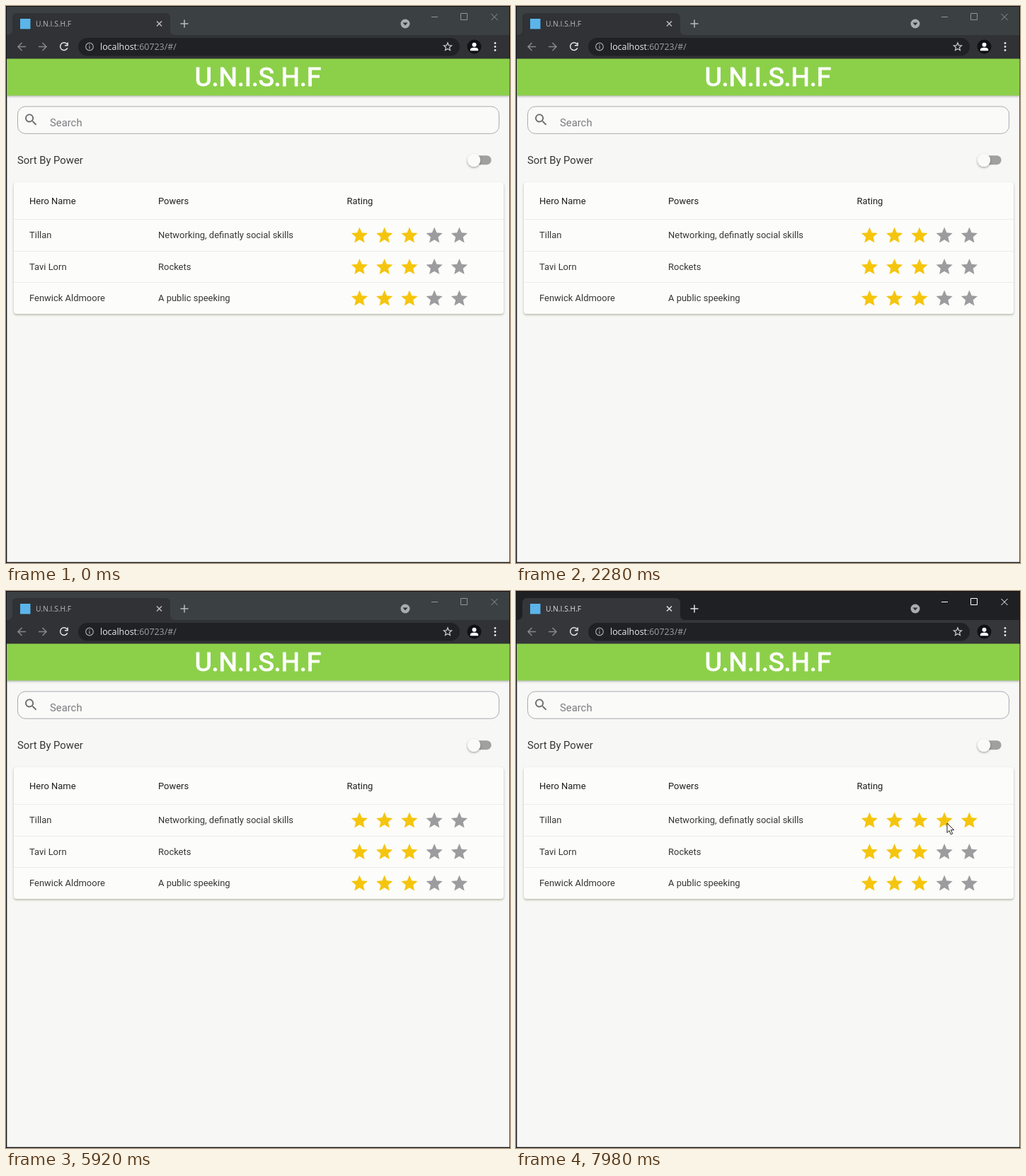
Animation of 712 by 787 pixels, one loop 8 s. Source, as an HTML page:

```html
<!DOCTYPE html>
<html lang="en">
<head>
<meta charset="utf-8">
<title>Hero ratings</title>
<style>
  html, body { margin: 0; width: 100%; height: 100%; overflow: hidden; background: #f7f8f5; }
  svg { display: block; width: 100%; height: 100%; --frame: #3b4043; --control: #929598; --tab-text: #b9bcbf; --tab: #303235; }
  svg.focused { --frame: #1e2023; --control: #fff; --tab-text: #dfe1e5; --tab: #35363a; }
  text { font-family: Roboto, sans-serif; font-size: 12.98px; fill: #363636; }
  .heading { fill: #1f1f1f; }
  .title { font-size: 37.08px; fill: #fff; stroke: #fff; stroke-width: 1.2; }
  .body { font-size: 14.83px; }
  .chrome { font-family: "Open Sans", sans-serif; }
  .line { fill: none; stroke-width: 1.5; }
</style>
</head>
<body>
<svg id="stage" viewBox="0 0 712 787">
  <defs>
    <path id="star" transform="scale(1.158) translate(-12 -12)" d="M12 17.27 18.18 21l-1.64-7.03L22 9.24l-7.19-.61L12 2 9.19 8.63 2 9.24l5.46 4.73L5.82 21z"/>
    <filter id="soft" x="-20%" y="-20%" width="140%" height="150%"><feGaussianBlur stdDeviation="1.8"/></filter>
  </defs>

  <!-- Browser window -->
  <rect width="712" height="787" fill="#111214"/>
  <rect x="1" y="1" width="710" height="41" fill="var(--frame)"/>
  <path fill="var(--tab)" d="M1 41q8 0 8-7V17q0-7 7-7H225q7 0 7 7V34q0 7 7 7H711V75H1z"/>
  <rect x="20" y="18" width="14.5" height="14.5" fill="#5bb5ea"/>
  <text class="chrome" x="42" y="29" style="font-size:10.3px;fill:var(--tab-text)">U.N.I.S.H.F</text>
  <path class="line" stroke="var(--tab-text)" d="M213 21.5l7 7m0-7l-7 7M246.5 25h11m-5.5-5.5v11"/>
  <circle cx="564" cy="25" r="6.5" fill="#a9adb1"/>
  <path fill="#303235" d="M560.5 23.5h7l-3.5 4z"/>
  <path fill="none" stroke="var(--control)" d="M601 15.5h9M642.5 10.5h9v9h-9zM685.5 11l9 9m0-9l-9 9"/>
  <g class="line" stroke="#85898d">
    <path d="M28 57.5H17m5.5-5.5L17 57.5l5.5 5.5M46 57.5h11m-5.5-5.5 5.5 5.5-5.5 5.5"/>
    <path stroke="#e4e6e8" d="M86.2 54A5.3 5.3 0 1 0 86.8 59.2M87.2 51.5v4.2H83"/>
  </g>
  <rect x="102" y="45" width="539" height="25.5" rx="12.75" fill="#202124"/>
  <g fill="none" stroke="#a3a7ab" stroke-width="1.2">
    <circle cx="118" cy="57.5" r="5.3"/>
    <path d="M118 56.5v4M118 54v1.3"/>
  </g>
  <text class="chrome" x="133" y="62" style="font-size:12.4px;fill:#e8eaed">localhost<tspan fill="#9aa0a6">:60723/#/</tspan></text>
  <use href="#star" transform="translate(624 57.5) scale(.48)" fill="none" stroke="#c9ccd0" stroke-width="2.2"/>
  <circle cx="661.5" cy="57.5" r="10" fill="#101114"/>
  <path fill="#fff" d="M655.8 63.2v-1.4q0-3 5.7-3t5.7 3v1.4z"/>
  <circle cx="661.5" cy="54.7" r="3" fill="#fff"/>
  <g fill="#e4e6e8"><circle cx="691" cy="52.5" r="1.4"/><circle cx="691" cy="57.5" r="1.4"/><circle cx="691" cy="62.5" r="1.4"/></g>

  <!-- Page -->
  <rect x="1.3" y="75" width="710" height="710.7" fill="#f7f8f5"/>
  <rect x="1.3" y="78" width="710" height="50" fill="#0004" filter="url(#soft)"/>
  <rect x="1.3" y="74.5" width="710" height="52" fill="#8cd04a"/>
  <text class="title" x="356" y="113.3" text-anchor="middle">U.N.I.S.H.F</text>

  <rect x="16.5" y="142" width="680" height="38.3" rx="11" fill="#fafaf8" stroke="#aaa9b3"/>
  <path fill="#706d70" transform="translate(24.3 149.6) scale(.927)" d="M15.5 14h-.79l-.28-.27C15.41 12.59 16 11.11 16 9.5 16 5.91 13.09 3 9.5 3S3 5.91 3 9.5 5.91 16 9.5 16c1.61 0 3.09-.59 4.23-1.57l.27.28v.79l5 4.99L20.49 19zm-6 0C7.01 14 5 11.99 5 9.5S7.01 5 9.5 5 14 7.01 14 9.5 11.99 14 9.5 14z"/>
  <text class="body" x="62" y="169.8" style="fill:#7d7c80">Search</text>
  <text class="body" x="16" y="222.7">Sort By Power</text>
  <rect x="655" y="211.2" width="30.6" height="13" rx="6.5" fill="#a0a09f"/>
  <circle cx="661" cy="219.3" r="9.3" fill="#0005" filter="url(#soft)"/>
  <circle cx="661" cy="217.8" r="9.3" fill="#fafafa"/>

  <rect x="11" y="250.5" width="692" height="186" rx="4" fill="#46562c66" filter="url(#soft)"/>
  <rect x="11" y="249" width="692" height="186" rx="4" fill="#fcfcfa"/>
  <path stroke="#ecece7" d="M11 301.5H703M11 346.5H703M11 390.5H703"/>
  <g id="table"></g>

  <path id="cursor" fill="#fff" stroke="#222" d="M0 0v13.5l3.1-2.9 2.3 5.3 2.3-1-2.3-5.2h4.3z"/>
</svg>
<script>
const LOOP = 8000, FOCUS_AT = 6300, RATED_AT = 7400;
const GOLD = '#f5c50e', GREY = '#9c9c9e';
const COLUMNS = [33, 215, 481.5];
const HEROES = [
  ['Tillan', 'Networking, definatly social skills'],
  ['Tavi Lorn', 'Rockets'],
  ['Fenwick Aldmoore', 'A public speeking'],
];
// Pointer stops: time, x, y
const POINTER = [[6900, 668, 300], [7300, 640, 325], [7480, 640, 325], [7800, 609, 328]];

const stage = document.getElementById('stage');
const table = document.getElementById('table');
const cursor = document.getElementById('cursor');

function add(tag, attributes, content = '') {
  const node = document.createElementNS(stage.namespaceURI, tag);
  for (const key in attributes) node.setAttribute(key, attributes[key]);
  node.textContent = content;
  return table.appendChild(node);
}

['Hero Name', 'Powers', 'Rating'].forEach((label, i) =>
  add('text', { x: COLUMNS[i], y: 279.7, class: 'heading' }, label));

const stars = HEROES.map((cells, row) => {
  const y = 323.6 + row * 44.5;
  cells.forEach((cell, i) => add('text', { x: COLUMNS[i], y: y + 4.4 }, cell));
  return Array.from({ length: 5 }, (_, i) =>
    add('use', { href: '#star', transform: `translate(${499.4 + i * 35.25} ${y + 0.5})` }));
});

function pointerAt(time) {
  const next = POINTER.findIndex(stop => stop[0] > time);
  if (next < 0) return POINTER.at(-1).slice(1);
  const [t0, x0, y0] = POINTER[next - 1], [t1, x1, y1] = POINTER[next];
  const p = (time - t0) / (t1 - t0), ease = p * p * (3 - 2 * p);
  return [x0 + (x1 - x0) * ease, y0 + (y1 - y0) * ease];
}

function draw(time) {
  stage.classList.toggle('focused', time >= FOCUS_AT);
  stars.forEach((line, row) => {
    const rating = row === 0 && time >= RATED_AT ? 5 : 3;
    line.forEach((star, i) => star.setAttribute('fill', i < rating ? GOLD : GREY));
  });
  const visible = time >= POINTER[0][0];
  cursor.style.display = visible ? '' : 'none';
  if (visible) cursor.setAttribute('transform', `translate(${pointerAt(time)})`);
}

const start = performance.now();
function tick() {
  draw((performance.now() - start) % LOOP);
  requestAnimationFrame(tick);
}
tick();
</script>
</body>
</html>
```
